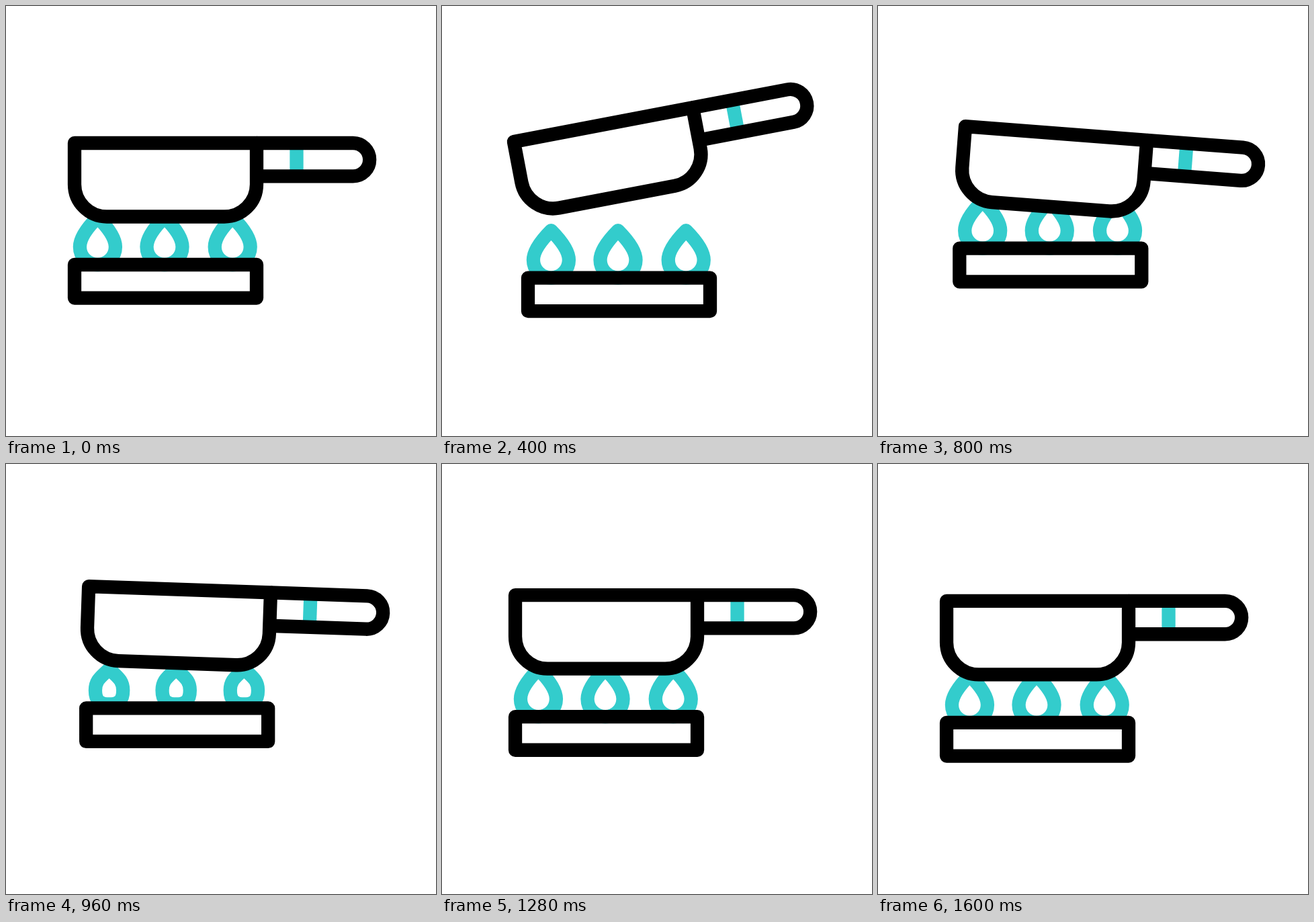
An HTML page with a canvas for the animation above (1.62 s loop, 640 px wide and 640 px high).

```html
<!DOCTYPE html>
<html lang="en">
<head>
<meta charset="utf-8">
<title>Pan on a stove</title>
<style>
html, body { margin: 0; width: 100%; height: 100%; overflow: hidden; background: #fff; }
canvas { display: block; width: 640px; height: 640px; }
</style>
</head>
<body>
<canvas id="stage" width="640" height="640"></canvas>
<script>
const ctx = document.getElementById('stage').getContext('2d');
const LOOP = 1620;
const BLACK = '#000';
const TEAL = '#33cccc';
const PIVOT = { x: 113, y: 318 };

// Each key is [time, value]; values ease in and out between keys.
const GROUP_X = [[0, 0], [486, 28.3], [790, 19.3], [LOOP, 0]];
const GROUP_Y = [[0, 0], [486, 21.3], [790, -24.3], [LOOP, 0]];
const TILT = [[60, 0], [340, -11.9], [726, 4.75], [1150, 0]];
const LIFT = [[60, 0], [405, 25.7], [670, 0]];
const SHRINK = [[0, 0], [200, 1], [400, 0], [600, 1], [800, 0], [1000, 1], [1200, 0]];

function valueAt(keys, t) {
  if (t <= keys[0][0]) return keys[0][1];
  for (let i = 1; i < keys.length; i++) {
    const [t0, a] = keys[i - 1];
    const [t1, b] = keys[i];
    if (t < t1) {
      const u = (t - t0) / (t1 - t0);
      return a + (b - a) * u * u * (3 - 2 * u);
    }
  }
  return keys[keys.length - 1][1];
}

function outline(color, fill) {
  if (fill) {
    ctx.fillStyle = fill;
    ctx.fill();
  }
  ctx.strokeStyle = color;
  ctx.stroke();
}

// The anchor points move in as the flame shrinks; the curve handles keep their length.
function drawFlame(x, shrink) {
  const y = 358.5;
  const r = 26.5 - 6.5 * shrink;
  const tip = y - 44 + 13.5 * shrink;
  const handle = 14.6;
  ctx.beginPath();
  ctx.moveTo(x, tip);
  ctx.bezierCurveTo(x + 12, tip + 12, x + r, y - 15.5, x + r, y);
  ctx.bezierCurveTo(x + r, y + handle, x + handle, y + r, x, y + r);
  ctx.bezierCurveTo(x - handle, y + r, x - r, y + handle, x - r, y);
  ctx.bezierCurveTo(x - r, y - 15.5, x - 12, tip + 12, x, tip);
  ctx.closePath();
  outline(TEAL);
}

function drawStove() {
  ctx.beginPath();
  ctx.rect(102, 385, 271, 49.6);
  outline(BLACK);
}

function drawPan(tilt, lift) {
  ctx.save();
  ctx.translate(PIVOT.x, PIVOT.y - lift);
  ctx.rotate(tilt * Math.PI / 180);
  ctx.translate(-PIVOT.x, -PIVOT.y);

  ctx.beginPath();
  ctx.moveTo(432.5, 208);
  ctx.lineTo(432.5, 249);
  outline(TEAL);

  ctx.beginPath();
  ctx.moveTo(373, 204);
  ctx.lineTo(516.5, 204);
  ctx.arc(516.5, 228.65, 24.65, -Math.PI / 2, Math.PI / 2);
  ctx.lineTo(373, 253.3);
  outline(BLACK);

  ctx.beginPath();
  ctx.moveTo(102, 204);
  ctx.lineTo(373, 204);
  ctx.lineTo(373, 265.5);
  ctx.arc(325, 265.5, 48, 0, Math.PI / 2);
  ctx.arc(150, 265.5, 48, Math.PI / 2, Math.PI);
  ctx.closePath();
  outline(BLACK, '#fff');
  ctx.restore();
}

function draw(now) {
  const t = now % LOOP;
  ctx.fillStyle = '#fff';
  ctx.fillRect(0, 0, 640, 640);
  ctx.lineWidth = 20.3;
  ctx.lineJoin = 'round';

  ctx.save();
  ctx.translate(valueAt(GROUP_X, t), valueAt(GROUP_Y, t));
  const shrink = valueAt(SHRINK, t);
  for (const x of [136.4, 236, 337.2]) drawFlame(x, shrink);
  drawStove();
  drawPan(valueAt(TILT, t), valueAt(LIFT, t));
  ctx.restore();
}

const start = performance.now();
function tick() {
  draw(performance.now() - start);
  requestAnimationFrame(tick);
}
tick();
</script>
</body>
</html>
```
